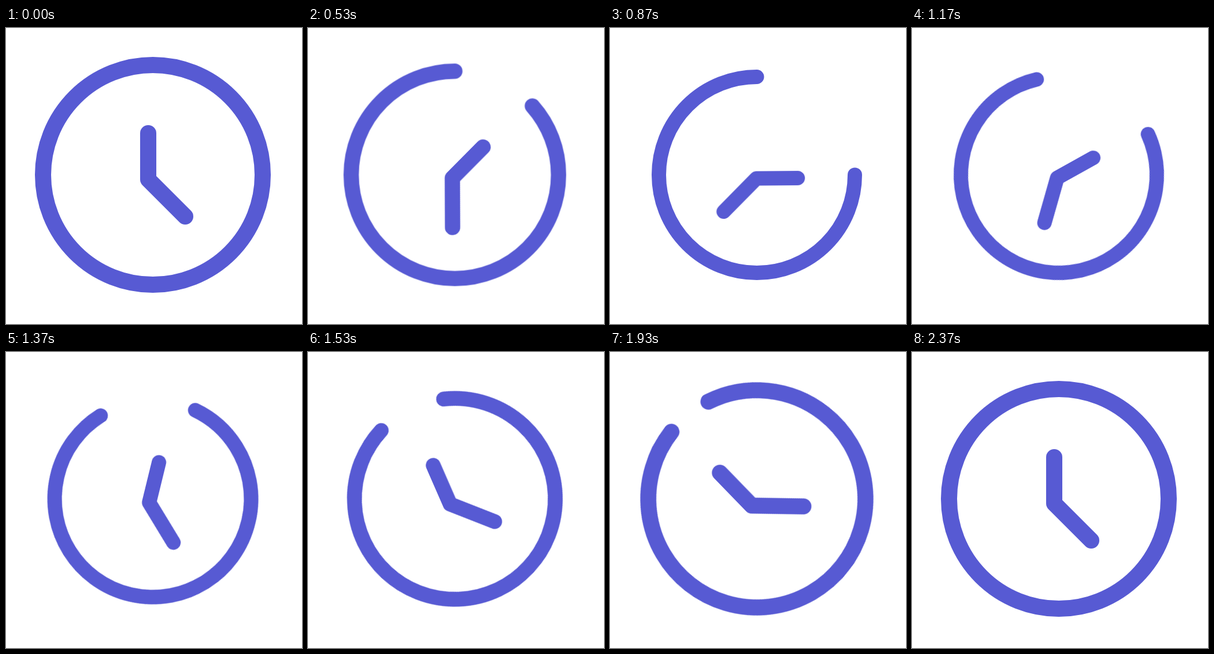
Animation of 512x512 px, one loop 2.4 s. Source, as an HTML page:

```html
<!DOCTYPE html>
<html lang="en">
<head>
<meta charset="utf-8">
<title>Clock</title>
<style>
  html, body {
    margin: 0;
    width: 100%;
    height: 100%;
    overflow: hidden;
    background: #fff;
  }

  svg {
    display: block;
    width: 100%;
    height: 100%;
    fill: none;
    stroke: #575ad3;
    stroke-width: 28;
    stroke-linecap: round;
    stroke-linejoin: round;
  }

  .clock, .ring, .hands {
    --soft: cubic-bezier(.333, 0, .667, 1);
    --late: cubic-bezier(.8, 0, .55, 1);
    transform-origin: 254px 254px;
    animation: 2400ms var(--soft) infinite;
  }

  .clock { animation-name: breathe; }

  /* One dash covers the whole ring; shifting it opens the gap. */
  .ring {
    stroke-dasharray: 360 360;
    animation-name: turn, gap;
  }

  .hands {
    transform-origin: 250.2px 265.1px;
    animation-name: swing;
  }

  @keyframes breathe {
    0% { transform: scale(1); }
    15.42% { transform: scale(1); animation-timing-function: var(--late); }
    37.5%, 54.17% { transform: scale(.892); }
    87.08%, 100% { transform: scale(1); }
  }

  @keyframes turn {
    0%, 37.5% { transform: rotate(0deg); }
    75% { transform: rotate(-60deg); }
    98.63%, 100% { transform: rotate(0deg); }
  }

  @keyframes gap {
    0% { stroke-dashoffset: 0; }
    15.42% { stroke-dashoffset: 0; animation-timing-function: var(--late); }
    36.88%, 39.17% { stroke-dashoffset: -90; }
    74.58%, 77.79% { stroke-dashoffset: -26.6; }
    98.63%, 100% { stroke-dashoffset: 0; }
  }

  @keyframes swing {
    0% { transform: rotate(0deg); }
    15.42% { transform: rotate(0deg); animation-timing-function: var(--late); }
    38.4% { transform: rotate(90deg); }
    74.25% { transform: rotate(-53deg); }
    98.12%, 100% { transform: rotate(0deg); }
  }
</style>
</head>
<body>
<svg viewBox="0 0 512 512">
  <g class="clock">
    <path class="ring" pathLength="360" d="M254 64a190 190 0 0 1 0 380a190 190 0 0 1 0-380"/>
    <path class="hands" d="M246 182v80l64 64"/>
  </g>
</svg>
</body>
</html>
```
